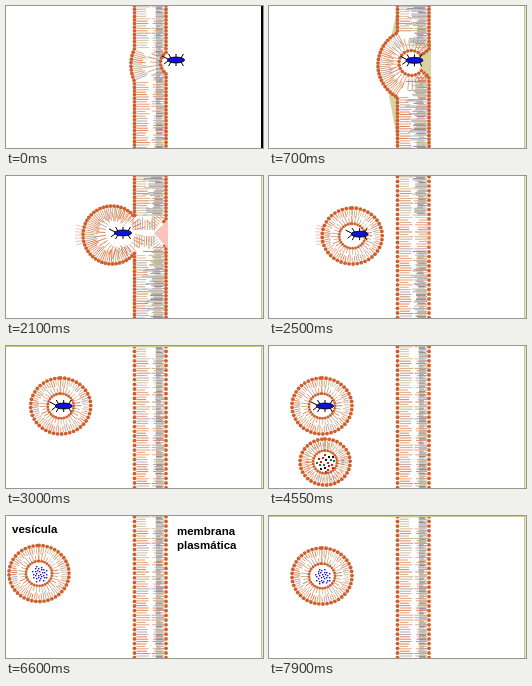
Recreate the animation shown at these times as an HTML page with a canvas. Size 257 by 142 pixels, loop 8 s.

```html
<!DOCTYPE html>
<html lang="es">
<head>
<meta charset="utf-8">
<title>Fagocitosis</title>
<style>
html, body { margin: 0; width: 100%; height: 100%; overflow: hidden; background: #fff; }
canvas { display: block; }
</style>
</head>
<body>
<canvas id="stage" width="257" height="142"></canvas>
<script>
const ctx = document.getElementById('stage').getContext('2d');
const W = 257, H = 142, LOOP = 8000, MID = 57;
const HEAD = '#cf5f2c', KHAKI = '#cfc88c', FONT = '"Liberation Sans", Arial, sans-serif';
const WARM = ['#dd6a35', '#e08a5c', '#b8a070', '#d8622c', '#c9b48e', '#a094a4'];
const GREY = ['#a0a0a6', '#b8b8bc', '#909096', '#c4b898', '#aca6b4'];

// The picture moves in steps, with pauses for reading
const every = (from, to) => Array.from({ length: (to - from) / 100 + 1 }, (_, i) => from + i * 100);
const STEPS = [...every(0, 3100), 3300, 3450, 3550, 4550, 4650, 4800, 4950, 5100, 6100, 6250, 6400, 6600, ...every(7600, 7900)];

const clamp = (v, lo, hi) => Math.max(lo, Math.min(hi, v));
const ramp = (t, from, to) => clamp((t - from) / (to - from), 0, 1);
const rnd = i => { const v = Math.sin(i * 12.9898 + 4.1) * 43758.5453; return v - Math.floor(v); };
const pick = (list, i) => list[Math.floor(rnd(i) * list.length)];

// Positions over time
const vesicleAt = t => {
  const aside = ramp(t, 6400, 6600) - ramp(t, 7500, 7900);
  return [165 - 59 * ramp(t, 0, 2100) - 57 * ramp(t, 2100, 3100) + 4 * ramp(t, 3100, 3550) - 20 * aside, 60 - 2.5 * aside];
};
const lysosomeAt = t => [97 - 45 * ramp(t, 3550, 4650), 126 - 10 * ramp(t, 3300, 3550) - 6 * ramp(t, 4650, 4800)];
const bugAt = t => {
  const x = t < 2100 ? 170 - 53 * ramp(t, 0, 2100) ** .7 : vesicleAt(t)[0] + 11 - 8 * ramp(t, 2100, 3000);
  const turn = ramp(t, 4650, 5100);
  return [x - 2 * turn, 54 + 6 * ramp(t, 0, 3000) ** 2 + 5 * turn, turn * Math.PI / 2];
};

// Cassini oval: a plain ellipse at e = 0, pinched at the waist as e nears 1
function oval(x, y, w, h, e = 0) {
  const b = h / Math.hypot(1, e), a2 = (e * b) ** 2;
  const stretch = w / (e * e > .5 ? b / (2 * e) : b * Math.sqrt(1 - e * e));
  return Array.from({ length: 121 }, (_, i) => {
    const q = i / 60 * Math.PI;
    const r = Math.sqrt(a2 * Math.cos(2 * q) + Math.sqrt(b ** 4 - (a2 * Math.sin(2 * q)) ** 2));
    return [x + stretch * r * Math.sin(q), y - r * Math.cos(q)];
  });
}

// Arc from upper to lower right, passing the left side; th is half the opening
function arc(cx, cy, r, th) {
  return Array.from({ length: 61 }, (_, i) => {
    const q = th + (2 * Math.PI - 2 * th) * i / 60;
    return [cx + r * Math.cos(q), cy - r * Math.sin(q)];
  });
}

const cut = (wall, cx, r) => Math.acos(clamp((wall - cx) / r, -1, 1));

function leftFace(t) {
  const cx = vesicleAt(t)[0], r = 40 - 11 * ramp(t, 0, 2100);
  const bulge = t < 2200 ? arc(cx, 59, r, cut(128.5, cx, r)) : [];
  return [[128.5, -4], ...bulge, [128.5, H + 4]];
}

function rightFace(t) {
  if (t >= 2200) return [[160, -4], [160, H + 4]];
  const cx = bugAt(t)[0] - 3, r = 12.5, mouth = 10 - 9 * ramp(t, 300, 1900);
  const th = Math.max(cut(160, cx, r), Math.asin(mouth / r));
  const x = Math.max(150, cx + r * Math.cos(th)), dy = r * Math.sin(th);
  return [[160, -4], [160, MID - 14], [x, MID - dy], ...arc(cx, MID, r, th), [x, MID + dy], [160, MID + 14], [160, H + 4]];
}

// Evenly spaced points with their normals
function walk(path, gap) {
  const out = [];
  let left = 0;
  for (let i = 1; i < path.length; i++) {
    const [x, y] = path[i - 1], dx = path[i][0] - x, dy = path[i][1] - y, d = Math.hypot(dx, dy);
    if (!d) continue;
    for (; left < d; left += gap) out.push([x + dx * left / d, y + dy * left / d, dy / d, -dx / d]);
    left -= d;
  }
  return out;
}

function fill(points, color, alpha = 1) {
  ctx.globalAlpha = alpha;
  ctx.fillStyle = color;
  ctx.beginPath();
  points.forEach(p => ctx.lineTo(p[0], p[1]));
  ctx.fill();
  ctx.globalAlpha = 1;
}

function line(x0, y0, x1, y1, color, width = .8) {
  ctx.strokeStyle = color;
  ctx.lineWidth = width;
  ctx.beginPath();
  ctx.moveTo(x0, y0);
  ctx.lineTo(x1, y1);
  ctx.stroke();
}

function dot(x, y, r) {
  ctx.fillStyle = HEAD;
  ctx.beginPath();
  ctx.arc(x, y, r, 0, 7);
  ctx.fill();
}

function tails(path, from, to, gap) {
  walk(path, gap).forEach(([x, y, nx, ny], i) => {
    const end = to * (.7 + .35 * rnd(i + 50));
    line(x + nx * from, y + ny * from, x + nx * end, y + ny * end, pick(WARM, i >> 1));
  });
}

const heads = (path, r, gap) => walk(path, gap).forEach(p => dot(p[0], p[1], r));

function bilayer(outer, inner) {
  fill(outer, '#fff');
  tails(outer, -2, -9, 2.6);
  tails(inner, 1, 8, 2.2);
  fill(inner, '#fff');
  heads(inner, 1.4, 2.8);
  heads(outer, 1.9, 4.1);
}

const vesicle = (x, y, w = 30, h = 28, r = 13) => bilayer(oval(x, y, w, h), oval(x, y, r, r * .95));

// Two vesicles fusing around a waist that widens as e falls
function fusing(e, half) {
  const y = 30 + half;
  bilayer(oval(53, y, 31, half, e), oval(53, y, 13, half - 17, .5 + e / 2));
  if (e < .9) return;
  ctx.globalAlpha = .6;
  for (let i = 0; i < 60; i++) {
    const side = i % 2 ? 1 : -1, x = 53 + side * (8 + 10 * rnd(i));
    line(x, y - 11 + 18 * rnd(i + 90), x + side * 4, y - 13 + 18 * rnd(i + 90), pick(GREY, i), 1);
  }
  ctx.globalAlpha = 1;
}

// Pale fringe behind a moving edge
function fringe(x, y, angle) {
  for (let i = -3; i <= 3; i++) {
    const c = Math.cos(angle + i * .09), s = Math.sin(angle + i * .09);
    line(x + 30 * c, y + 30 * s, x + 37 * c, y + 37 * s, '#f0b0a8');
  }
}

function bug(x, y, turn) {
  ctx.save();
  ctx.translate(x, y);
  ctx.rotate(turn);
  for (const side of [-1, 1]) {
    for (const leg of [-5, 0, 5]) line(leg, side * 2, leg * 1.5, side * 6, '#000', 1);
    line(-8, side, -13 + side, 4 * side, '#000', 1);
  }
  ctx.beginPath();
  ctx.ellipse(0, 0, 8.5, 2.9, 0, 0, 7);
  ctx.fillStyle = '#1010e0';
  ctx.fill();
  ctx.strokeStyle = '#000';
  ctx.lineWidth = .9;
  ctx.stroke();
  ctx.restore();
}

function grains(x, y, rx, ry, count, size, colors) {
  for (let i = 0; i < count; i++) {
    const a = i * 2.4, r = Math.sqrt((i + .5) / count);
    ctx.fillStyle = colors[i % colors.length];
    ctx.fillRect(Math.round(x + rx * r * Math.cos(a)), Math.round(y + ry * r * Math.sin(a)), size, size);
  }
}
const enzymes = (x, y) => grains(x, y, 10, 9, 20, 2, ['#e01818', '#108030', '#101010', '#e01818']);
const remains = (x, y, ry = 8) => grains(x, y, 8, ry, 30, 1.4, ['#2010d8']);

// Grey shading on the right side, spreading while the wall is under strain
function shade(strain) {
  for (let y = 0; y < H; y += 1.3) {
    if (strain && Math.abs(y - MID) < 18) continue;
    const x = 150 - 14 * strain * rnd(y + 7);
    line(x, y, 154 + 5 * rnd(y), y, pick(GREY, y), 1);
  }
}

function membrane(t) {
  const l = leftFace(t), r = rightFace(t), gap = t < 2200 ? 3.6 : 4.7;
  const strain = ramp(t, 0, 700) - ramp(t, 2200, 2800);
  const khaki = .8 * (ramp(t, 0, 500) - ramp(t, 900, 1500));
  const pink = ramp(t, 1300, 2000) - ramp(t, 2200, 2700);
  fill([[129, 0], [120, 40], [120, 90], [129, 138]], KHAKI, khaki);
  fill([[162, 36], [148, 42], [152, 66], [162, 70]], KHAKI, khaki);
  fill([...l, ...r.slice().reverse()], '#fff');
  tails(l, 2, 15, 2.4);
  tails(r, -2, -14, 2.4);
  shade(strain);
  const lining = 1.8 * (1 - ramp(t, 700, 2000));
  walk(r, gap).forEach(([x, y]) => dot(x, y, x > 157 ? 1.9 : lining));
  heads(l, 1.9, gap);
  fill([[148, MID], [162, MID - 13], [162, MID + 16]], '#fac4bc', pink);
}

function label(str, x, y, font) {
  ctx.fillStyle = '#000';
  ctx.font = `${font} ${FONT}`;
  ctx.fillText(str, x, y);
}

function border(t) {
  ctx.fillStyle = t < 100 ? '#000' : KHAKI;
  ctx.fillRect(255, 0, t < 100 ? 2 : 1.5, H);
  if ((t >= 2800 && t < 3450) || t >= 7600) ctx.fillRect(0, 0, W, 1);
}

function draw(t) {
  const within = (from, to) => t >= from && t < to;
  const [x, y] = vesicleAt(t);
  ctx.fillStyle = '#fff';
  ctx.fillRect(0, 0, W, H);
  membrane(t);
  if (within(1800, 2700)) fringe(x, 59, Math.PI);
  if (within(2200, 4950) || t >= 6600) vesicle(x, y);
  if (within(3300, 4950)) {
    const [lx, ly] = lysosomeAt(t);
    vesicle(lx, ly, 25, 23, 12);
    enzymes(lx, ly);
  }
  if (within(4950, 6600)) {
    const e = t < 5100 ? .99 : .955 - .65 * ramp(t, 6100, 6400), half = 51.5 - 5 * ramp(t, 6250, 6400);
    fringe(53, 60, -Math.PI / 2);
    fusing(e, half);
    if (t < 6250) enzymes(53, 103);
    else remains(53, 30 + half, half / 3);
  }
  if (t >= 6600) remains(x, y);
  if (t < 6250) bug(...bugAt(t));
  if (within(5100, 6100)) label('lisosoma secundario', 6, 21, '11px');
  if (within(6600, 7600)) {
    label('vesícula', 6, 17, 'bold 11.5px');
    label('membrana', 171, 19, 'bold 11.5px');
    label('plasmática', 171, 33, 'bold 11.5px');
  }
  border(t);
}

let shown = -1;
function tick() {
  const now = performance.now() % LOOP;
  const t = STEPS.filter(s => s <= now).pop();
  if (t !== shown) draw(shown = t);
  requestAnimationFrame(tick);
}
tick();
</script>
</body>
</html>
```
